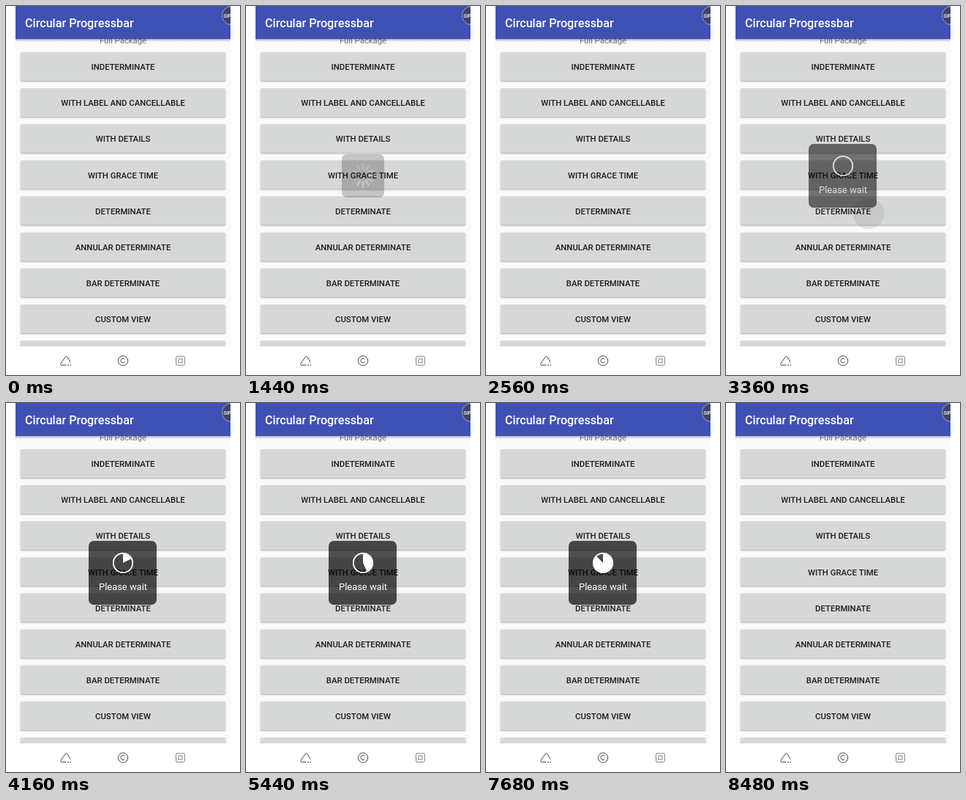
Animation of 320x503 px, one loop 9600 ms. Source, as an HTML page with a canvas:

```html
<!DOCTYPE html>
<html>
<head>
<meta charset="utf-8">
<style>
html, body { margin: 0; height: 100%; overflow: hidden; background: #fff; }
canvas { display: block; width: 320px; height: 503px; }
</style>
</head>
<body>
<canvas id="stage"></canvas>
<script>
const LOOP = 9600, STEP = 160, W = 320, H = 503;
const LABELS = ['INDETERMINATE', 'WITH LABEL AND CANCELLABLE', 'WITH DETAILS', 'WITH GRACE TIME',
  'DETERMINATE', 'ANNULAR DETERMINATE', 'BAR DETERMINATE', 'CUSTOM VIEW', ''];
const canvas = document.getElementById('stage');
const c = canvas.getContext('2d');
const dpr = window.devicePixelRatio || 1;
canvas.width = W * dpr;
canvas.height = H * dpr;

function text(s, x, y, size, color, weight = 400, align = 'center') {
  c.font = `${weight} ${size}px Roboto, sans-serif`;
  c.textAlign = align;
  c.fillStyle = color;
  c.fillText(s, x, y);
}

function roundBox(x, y, w, h, r) {
  c.beginPath();
  c.roundRect(x, y, w, h, r);
}

function circle(x, y, r) {
  c.beginPath();
  c.arc(x, y, r, 0, Math.PI * 2);
}

function clipTo(x, y, w, h, draw) {
  c.save();
  c.beginPath();
  c.rect(x, y, w, h);
  c.clip();
  draw();
  c.restore();
}

const rowTop = i => 63 + 49.14 * i;

function drawList() {
  c.fillStyle = '#fafafa';
  c.fillRect(13, 45, 294, 419);
  text('Full Package', 160, 51, 11.35, '#757575');
  LABELS.forEach((label, i) => {
    const y = rowTop(i);
    c.save();
    c.shadowColor = 'rgba(0,0,0,.32)';
    c.shadowBlur = 2 * dpr;
    c.shadowOffsetY = dpr;
    c.fillStyle = '#d6d7d7';
    roundBox(20, y, 280, 39, 1.6);
    c.fill();
    c.restore();
    text(label, 160, y + 24.2, 11.35, '#1c1c22', 500);
  });
}

function drawHeader() {
  const shade = c.createLinearGradient(0, 45, 0, 49);
  shade.addColorStop(0, 'rgba(0,0,0,.28)');
  shade.addColorStop(1, 'rgba(0,0,0,0)');
  c.fillStyle = shade;
  c.fillRect(13, 45, 294, 4);
  c.fillStyle = '#3f51b5';
  c.fillRect(13, 0, 294, 45);
  text('Circular Progressbar', 26, 29, 16.15, '#fff', 500, 'left');
  clipTo(13, 0, 294, 45, () => {
    circle(308, 13, 12.5);
    c.fillStyle = '#3f4566';
    c.fill();
    c.strokeStyle = '#a3a6b4';
    c.lineWidth = 1;
    c.stroke();
    text('GIF', 297.5, 15.5, 6.5, '#fff', 500, 'left');
  });
}

function drawNav() {
  c.strokeStyle = '#333';
  c.lineWidth = 0.9;
  c.stroke(new Path2D('M82 489.5H75.5Q74 489 75 487L81.5 478Q83 476.5 84 478.5L88 485.5M84 489.5H86M87.5 489.5H89'));
  circle(160, 483.5, 6.7);
  c.stroke();
  c.beginPath();
  c.arc(160, 483.5, 3, 0.8, 5.5);
  c.stroke();
  c.strokeStyle = '#777';
  roundBox(232.5, 477.5, 12, 12, 2);
  c.stroke();
  c.strokeRect(236, 481, 5, 5);
}

// Touch dot first, then a ripple that spreads over the row and fades.
function drawTouch(age, row, x, y) {
  if (age < 0 || age >= 3 * STEP) return;
  if (age < STEP) {
    c.fillStyle = 'rgba(0,0,0,.07)';
    circle(x, y, 21.5);
    c.fill();
    return;
  }
  clipTo(20, rowTop(row), 280, 39, () => {
    c.fillStyle = `rgba(0,0,0,${0.14 * (1 - age / (3 * STEP))})`;
    circle(x, y, 22 + age * 0.6);
    c.fill();
  });
}

function drawPanel(x, y, w, h) {
  c.fillStyle = 'rgba(0,0,0,.68)';
  roundBox(x, y, w, h, 7);
  c.fill();
}

function drawSpinner(t) {
  drawPanel(131, 202, 58, 59);
  const head = 3 + Math.floor((t - 2080) * 12 / 1000);
  c.lineCap = 'round';
  c.lineWidth = 3;
  for (let i = 0; i < 12; i++) {
    const a = (head - i) * Math.PI / 6, dx = Math.sin(a), dy = -Math.cos(a);
    c.strokeStyle = `rgba(255,255,255,${1 - i * 0.065})`;
    c.beginPath();
    c.moveTo(160 + dx * 8.5, 231 + dy * 8.5);
    c.lineTo(160 + dx * 15, 231 + dy * 15);
    c.stroke();
  }
  c.lineCap = 'butt';
}

function drawPie(t) {
  drawPanel(113, 188, 93, 87);
  const part = Math.min(1, Math.max(0, (t - 3290) / 5000));
  c.strokeStyle = c.fillStyle = '#fff';
  c.lineWidth = 1.8;
  circle(160, 218, 13.2);
  c.stroke();
  if (t > 3360) {
    c.beginPath();
    c.moveTo(160, 218);
    c.arc(160, 218, 13.2, -Math.PI / 2, (part * 2 - 0.5) * Math.PI);
    c.fill();
  }
  text('Please wait', 160, 254.7, 12.93, '#fff');
}

function popup(t, start, end, first, draw) {
  if (t < start || t >= end) return;
  c.globalAlpha = t < start + STEP ? first : t >= end - STEP ? 0.6 : 1;
  draw(t);
  c.globalAlpha = 1;
}

function frame(now) {
  const t = Math.floor(now % LOOP / STEP) * STEP;
  c.setTransform(dpr, 0, 0, dpr, 0, 0);
  c.fillStyle = '#fff';
  c.fillRect(0, 0, W, H);
  clipTo(13, 45, 294, 419, drawList);
  drawHeader();
  drawNav();
  drawTouch(t - 480, 3, 195, 233);
  drawTouch(t - 3360, 4, 195, 283);
  popup(t, 1440, 2560, 0.32, drawSpinner);
  popup(t, 3360, 8480, 0.8, drawPie);
}

const begin = performance.now();
function tick() {
  frame(performance.now() - begin);
  requestAnimationFrame(tick);
}
tick();
</script>
</body>
</html>
```
